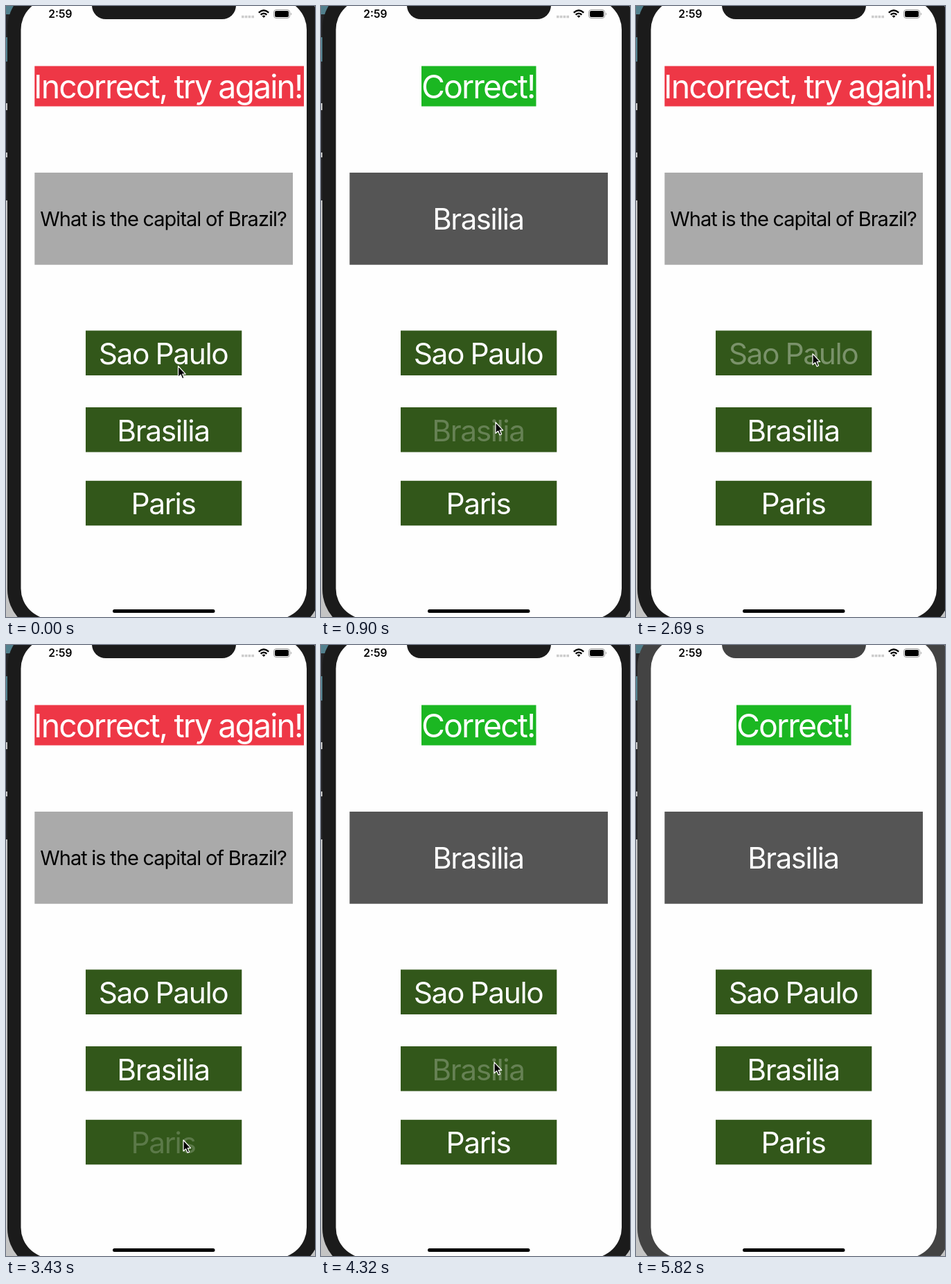
An HTML page that plays this animation: 446 px wide and 880 px high, repeating every 5.92 s.

```html
<!DOCTYPE html>
<html lang="en">
<head>
<meta charset="utf-8">
<title>Capital quiz</title>
<style>
  html, body { margin: 0; width: 100%; height: 100%; overflow: hidden; }
  svg { display: block; width: 446px; height: 880px; }
  text {
    font-family: Inter, "Liberation Sans", sans-serif;
    font-optical-sizing: none;
    letter-spacing: -.034em;
    word-spacing: -.02em;
    text-anchor: middle;
    fill: #fff;
  }
  .title { font-size: 46.5px; letter-spacing: -.042em; }
  .answer { font-size: 42.5px; }
</style>
</head>
<body>
<svg viewBox="0 0 446 880">
  <!-- desktop behind the phone -->
  <rect width="446" height="880" fill="#c4c4c4"/>
  <g fill="#252527">
    <rect width="14" height="140"/>
    <rect y="150" width="4" height="61"/>
    <rect y="218" width="4" height="62"/>
  </g>
  <path d="M0 0H14V12H0ZM0 45H4V80H0Z" fill="#52808d"/>

  <!-- phone -->
  <rect id="body" x="2" y="-30" width="452" height="932" rx="62"/>
  <rect x="21.5" y="-10" width="412.5" height="893" rx="44" fill="#fefefe"/>
  <path id="notch" d="M124 -10V-1A20 20 0 0 0 144 19H312A20 20 0 0 0 332 -1V-10Z"/>
  <rect x="154" y="869" width="147.5" height="5" rx="2.5"/>

  <!-- status bar -->
  <text x="78.3" y="17" font-size="15.6" font-weight="600" style="fill:#000;letter-spacing:0">2:59</text>
  <path d="M340 15.5H358" stroke="#ccc" stroke-width="3.4" stroke-dasharray="3.6 1.2"/>
  <g fill="none" stroke="#000" stroke-width="2.3">
    <path d="M364.8 9.6Q372 3 379.2 9.6M367.6 12.6Q372 8.6 376.4 12.6"/>
    <path d="M369.6 14.6Q372 12.6 374.4 14.6L372 17Z" fill="#000" stroke="none"/>
  </g>
  <rect x="386.5" y="5.5" width="23" height="12" rx="3.5" fill="none" stroke="#999"/>
  <rect x="388" y="7" width="20" height="9" rx="2"/>
  <path d="M411 9.5Q413 11.5 411 13.5Z" fill="#999"/>

  <!-- quiz -->
  <g id="wrong">
    <rect x="41.3" y="86.5" width="388.7" height="58" fill="#ee3746"/>
    <text class="title" x="233.8" y="133">Incorrect, try again!</text>
    <rect x="41.3" y="240" width="372.7" height="132.7" fill="#aaa"/>
    <text x="227" y="317" font-size="29" style="fill:#000">What is the capital of Brazil?</text>
  </g>
  <g id="right">
    <rect x="145" y="86.5" width="165.5" height="58" fill="#1bb722"/>
    <text class="title" x="226.7" y="133">Correct!</text>
    <rect x="41.3" y="240" width="372.7" height="132.7" fill="#555"/>
    <text x="227" y="322" font-size="41.9">Brasilia</text>
  </g>
  <g fill="#32571a">
    <rect x="115" y="467.5" width="225.3" height="64.5"/>
    <rect x="115" y="578" width="225.3" height="64.5"/>
    <rect x="115" y="683.8" width="225.3" height="64.5"/>
  </g>
  <text class="answer" x="227" y="516">Sao Paulo</text>
  <text class="answer" x="227" y="626.5">Brasilia</text>
  <text class="answer" x="227" y="732">Paris</text>

  <path id="cursor" d="M0 0V16L3.6 12.6L6 18.3L8.6 17.1L6.2 11.6H10.7Z" stroke="#fff" stroke-width="1.2" stroke-linejoin="round"/>
</svg>
<script>
const LOOP = 5920, STEP = 148.8; // the screen refreshes once per STEP
const $ = id => document.getElementById(id);
const answers = document.querySelectorAll('.answer');

// pointer stops: step, x, y
const stops = [
  [0, 248.5, 518.5], [4, 252, 599.5], [9, 252, 599.5], [13, 255, 500.8],
  [19, 255, 500.8], [22, 256, 713], [25, 256, 713], [27, 250, 600.8],
  [29, 250, 600.8], [31, 400, 841.5], [32, 430, 865], [33, 450, 890]
];

// taps: answer index, first step, label opacity on each following step
const taps = [
  [1, 5, [.2, .25, .8]],
  [0, 16, [.2, .22, .35, .85]],
  [2, 23, [.2, .25, .8]],
  [1, 28, [.2, .25, .8]]
];

function pointerAt(step) {
  const next = stops.findIndex(s => s[0] > step);
  if (next < 0) return stops[stops.length - 1].slice(1);
  const [t0, x0, y0] = stops[next - 1], [t1, x1, y1] = stops[next];
  const k = (step - t0) / (t1 - t0);
  return [x0 + (x1 - x0) * k, y0 + (y1 - y0) * k];
}

function draw(now) {
  const step = Math.floor(now % LOOP / STEP);
  const correct = step >= 6 && step < 17 || step >= 29;
  $('right').style.display = correct ? '' : 'none';
  $('wrong').style.display = correct ? 'none' : '';

  answers.forEach((label, i) => {
    const tap = taps.find(([a, from, fade]) => a === i && step >= from && step < from + fade.length);
    label.style.opacity = tap ? tap[2][step - tap[1]] : 1;
  });

  $('cursor').setAttribute('transform', `translate(${pointerAt(step)})`);
  $('cursor').style.display = step < 33 ? '' : 'none';

  // the window loses focus at the end
  const shell = step >= 39 ? '#434343' : '#1b1b1b';
  $('body').style.fill = $('notch').style.fill = shell;
}

const start = performance.now();
function tick() {
  draw(performance.now() - start);
  requestAnimationFrame(tick);
}
tick();
</script>
</body>
</html>
```
